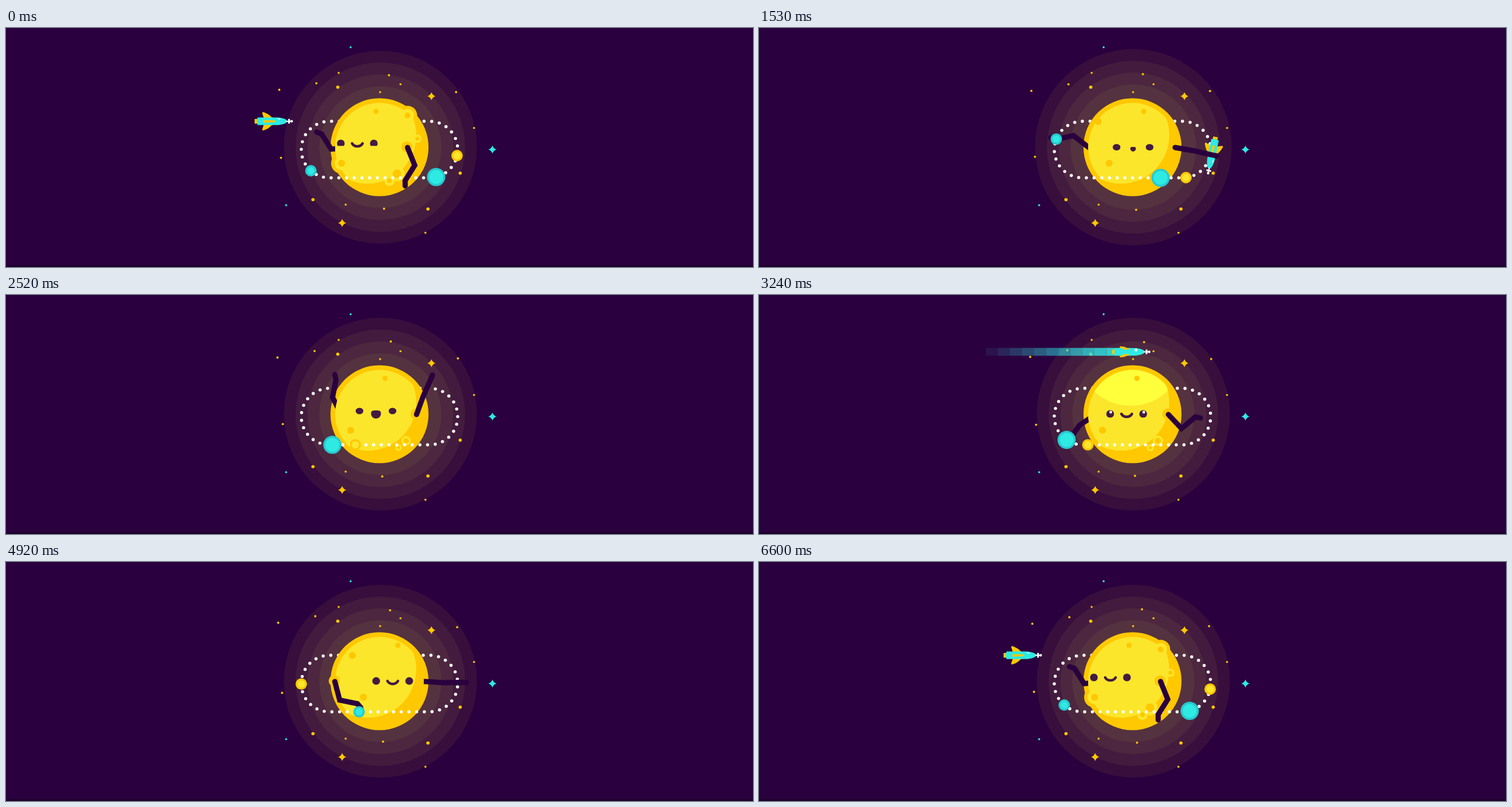
An HTML page with a canvas for the animation above (6.63 s loop, 1280x410 px).

```html
<!DOCTYPE html>
<html lang="en">
<head>
<meta charset="utf-8">
<title>Juggling sun</title>
<style>
html, body { margin: 0; width: 100%; height: 100%; overflow: hidden; background: #2a003e; }
canvas { display: block; width: 100%; height: 100%; }
</style>
</head>
<body>
<canvas id="stage" width="1280" height="410"></canvas>
<script>
const ctx = document.getElementById('stage').getContext('2d');
const LOOP = 6630, STEP = 30, TAU = Math.PI * 2;
const NIGHT = '#2a003e', AMBER = '#ffc800', YELLOW = '#fbe62c', CYAN = '#2eeae3',
      TEAL = '#26cad0', INK = '#441a42', WHITE = '#fff';
const SUN = { x: 640, y: 204.5, r: 84, inner: 76 };

const clamp = v => Math.max(0, Math.min(1, v));
const ramp = (t, from, to) => clamp((t - from) / (to - from));
const ease = (t, from, to) => {
  const u = ramp(t, from, to);
  return u * u * (3 - 2 * u);
};

// Smooth, overshoot-free curve through one value per pose, repeating every loop.
const POSES = [0, 1530, 2520, 3240, 4200, 5670];
function track(...values) {
  const n = POSES.length, at = i => (i + n) % n;
  const time = i => POSES[at(i)] + Math.floor(i / n) * LOOP;
  const rate = i => (values[at(i + 1)] - values[at(i)]) / (time(i + 1) - time(i));
  const slope = i => {
    const a = rate(i - 1), b = rate(i);
    return a * b > 0 ? 2 * a * b / (a + b) : 0;
  };
  return t => {
    let i = n - 1;
    while (i > 0 && POSES[i] > t) i--;
    const h = time(i + 1) - time(i), u = (t - time(i)) / h, v = 1 - u;
    return values[i] * v * v * (1 + 2 * u) + values[at(i + 1)] * u * u * (3 - 2 * u)
      + h * u * v * (slope(i) * v - slope(i + 1) * u);
  };
}

const turn = track(0, 25, 15.5, 13.5, 47, 20);
const faceX = track(602, 641, 634, 630, 665, 656);
const faceY = track(198, 204.5, 199, 204, 201, 207.5);
// Arm angles in degrees: upper arm, forearm.
const rightArm = [track(68, 10, -70, 47, -51, 64), track(122, 13, -66, -40, -95, 109)];
const leftArm = [track(175, 218, 243, 146, 68, 94), track(238, 168, 281, 125, -12, 67)];

// Orbit: a stadium travelled clockwise from its bottom right.
const ORBIT = { l: 554.5, r: 725.5, y: 208.5, rad: 48.5 };
const SIDE = ORBIT.r - ORBIT.l, BEND = Math.PI * ORBIT.rad, LAP = 2 * (SIDE + BEND);
function orbit(s) {
  const { l, r, y, rad } = ORBIT;
  s = ((s % LAP) + LAP) % LAP;
  if (s < SIDE) return [r - s, y + rad, Math.PI];
  s -= SIDE;
  if (s < BEND) return [l - rad * Math.sin(s / rad), y + rad * Math.cos(s / rad), Math.PI + s / rad];
  s -= BEND;
  if (s < SIDE) return [l + s, y - rad, 0];
  const a = (s - SIDE) / rad;
  return [r + rad * Math.sin(a), y - rad * Math.cos(a), a];
}

// A slow drift with two pushes that complete one lap per loop.
const DOTS = 49, DRIFT = 0.032, PUSH = 108;
const spin = (t, delay = 0) => 10 + DRIFT * t + PUSH * ease(t, 1530, 2760)
  + (LAP - PUSH - DRIFT * LOOP) * ease(t - delay, 4057, 5839);
const planets = [
  { lead: 196, delay: -517, sway: 16, r: 9.8, core: 6.3, rim: TEAL, fill: CYAN },
  { lead: 571, delay: 500, sway: 16, r: 9.8, core: 6.3, rim: AMBER, fill: YELLOW },
  { lead: -21.6, delay: 0, sway: 0, r: 15.6, core: 12, rim: TEAL, fill: CYAN }
];
const planetAt = (p, t) =>
  orbit(spin(t, p.delay) + p.lead + p.sway * Math.sin(Math.PI * t / LOOP));

function disc(x, y, r, fill) {
  if (r <= 0) return;
  ctx.fillStyle = fill;
  ctx.beginPath();
  ctx.arc(x, y, r, 0, TAU);
  ctx.fill();
}
function shape(d, fill) {
  ctx.fillStyle = fill;
  ctx.fill(new Path2D(d));
}
function placed(x, y, draw) {
  ctx.save();
  ctx.translate(x, y);
  draw();
  ctx.restore();
}
function clipped(x, y, r, draw) {
  ctx.save();
  ctx.beginPath();
  ctx.arc(x, y, r, 0, TAU);
  ctx.clip();
  draw();
  ctx.restore();
}

const wandering = [[473, 222.7], [530, 94.8], [658, 81], [466.5, 106], [773, 110], [646, 310]];
const steady = [[570, 77], [676, 96.5], [641, 110], [802, 171.5], [582, 303], [718.7, 351.3]];
const bright = [[568.5, 101.5], [778.3, 249], [526, 294.5], [723, 310.5]];
const icy = [[590.5, 33], [480, 304]];
const sparkles = [[729, 117, AMBER], [833.5, 208.5, CYAN], [576, 334.5, AMBER]];

function sky(t) {
  const grow = 3 * Math.exp(-(((t - 1530) / 380) ** 2));
  ['#380e3d', '#431b3e', '#4c273f', '#55323f'].forEach((c, i) =>
    disc(641.5, 204.5, 165.5 - 20.3 * i + grow, c));
  wandering.forEach(([x, y], i) => {
    const a = t / LOOP * TAU + (i + 1) * Math.PI;
    disc(x + 1.8 * Math.cos(a), y + 1.8 * Math.sin(a), 1.9, AMBER);
  });
  for (const [x, y] of steady) disc(x, y, 1.8, AMBER);
  for (const [x, y] of bright) disc(x, y, 2.8, AMBER);
  for (const [x, y] of icy) disc(x, y, 1.8, CYAN);
  for (const [x, y, c] of sparkles) placed(x, y, () => {
    shape('M0-7Q1.6-1.6 7 0Q1.6 1.6 0 7Q-1.6 1.6-7 0Q-1.6-1.6 0-7Z', c);
    disc(0, 0, 3.4, c);
  });
}

// Craters slide with the turn; rims open or close as they near the limb.
function craters(c) {
  const open = (from, to) => Math.sqrt(ramp(c, from, to));
  const near = open(12, 0), low = open(25, 0);
  return [
    { x: 634, y: 143, dot: 4.5, rim: 8 * open(35, 47) },
    { x: 688, y: 150, dot: 5 * near, rim: 11 * near },
    { x: 575, y: 232, dot: 6, rim: 12 * near },
    { x: 705, y: 190, dot: 3.5 * near, rim: 7 * near },
    { x: 670, y: 250, dot: 7.5 * low, rim: 13 * low },
    { x: 657, y: 262, dot: 4 * low, rim: 9 * low },
    { x: 556, y: 160.5, dot: 6, rim: 0 }
  ].map(k => ({ ...k, x: k.x + c }));
}

// The hand bends part of the way back towards the upper arm's direction.
function arm(x, angles, t) {
  const [upper, fore] = angles.map(f => f(t));
  const bones = [[33, upper], [31, fore], [9, fore + 0.6 * (upper - fore)]];
  let y = 205;
  ctx.strokeStyle = NIGHT;
  ctx.lineWidth = 9;
  ctx.lineCap = 'round';
  ctx.lineJoin = 'miter';
  ctx.beginPath();
  ctx.moveTo(x, y);
  for (const [length, angle] of bones) {
    x += length * Math.cos(angle * TAU / 360);
    y += length * Math.sin(angle * TAU / 360);
    ctx.lineTo(x, y);
  }
  ctx.stroke();
}

function face(t, lit) {
  const x = faceX(t), y = faceY(t);
  const gape = ease(t, 1150, 1850) * (1 - ease(t, 2700, 2900));
  const open = 1 - 0.85 * Math.exp(-(((t - 110) / 87) ** 2));
  for (const side of [-28.3, 28.3]) placed(x + side, y, () => {
    ctx.beginPath();
    ctx.rect(-9, -9, 18, 9 + 6.6 * (2 * open - 1));
    ctx.clip();
    ctx.scale(1, 1 - 0.15 * clamp(gape * 2));
    disc(0, 0, 6.6, INK);
    if (lit) disc(1, -3, 2.4, WHITE);
  });
  if (gape > 0.25) {
    placed(x, y + 6 * gape, () => {
      ctx.scale(gape, gape);
      shape('M-8.5-2C-8.5-8-2-7 0-7C2-7 8.5-8 8.5-2C8.5 4 4 7 0 7C-4 7-8.5 4-8.5-2Z', INK);
    });
  } else {
    ctx.strokeStyle = INK;
    ctx.lineWidth = 4.4;
    ctx.lineCap = 'round';
    ctx.beginPath();
    ctx.moveTo(x - 9, y);
    ctx.bezierCurveTo(x - 5, y + 6.7, x + 5, y + 6.7, x + 9, y);
    ctx.stroke();
  }
}

// Rocket: arrive, cruise on the orbit, get thrown away, dash across the top.
const SPEED = 0.231, JOIN = SIDE + BEND, ENTRY = 458, ARRIVE = 5900;
const THROW = 1590, THROW_TIME = 540, DASH = 2740, DASH_END = 4000;
function arrive(t) {
  const left = LOOP - t;
  return [ENTRY - 0.233 * left + 0.000143 * left * left, ORBIT.y - ORBIT.rad, 0];
}
function cruise(t) {
  const x = ENTRY + SPEED * t;
  if (x < ORBIT.l) return [x, ORBIT.y - ORBIT.rad, 0];
  const [ox, oy, angle] = orbit(JOIN + x - ORBIT.l);
  return [ox + 3 * Math.sin(angle), oy, angle];
}
function thrown(t) {
  const u = ramp(t, THROW, THROW + THROW_TIME) ** 1.4, v = 1 - u;
  const point = (a, b, c, d) => v * v * v * a + 3 * v * v * u * b + 3 * v * u * u * c + u * u * u * d;
  const rise = (a, b, c, d) => v * v * (b - a) + 2 * v * u * (c - b) + u * u * (d - c);
  const xs = [775, 900, 600, 295], ys = [228, 400, 440, 258];
  return [point(...xs), point(...ys), Math.atan2(rise(...ys), rise(...xs))];
}
const dash = t => [637 + 0.69 * (t - 3240), 97.5, 0];
const edgeFade = x => ramp(x, 300, 350) * ramp(x, 970, 860);

function rocketAt(t) {
  if (t >= ARRIVE) return { pos: arrive(t), alpha: ramp(t, ARRIVE, ARRIVE + 200) };
  if (t < THROW) return { pos: cruise(t), alpha: 1 };
  const flight = t < DASH
    ? { path: thrown, start: THROW, end: THROW + THROW_TIME, fin: 1 }
    : { path: dash, start: DASH, end: DASH_END, fin: 0.58 };
  const pos = flight.path(t);
  return { ...flight, pos, alpha: t < flight.end ? edgeFade(pos[0]) : 0 };
}

function trail(t, { path, start, end }) {
  ctx.lineCap = 'butt';
  ctx.lineWidth = 13.5;
  ctx.strokeStyle = '#2fdfe0';
  for (let i = 0; i < 12; i++) {
    const now = t - i * STEP, before = now - STEP;
    if (before < start || before >= end) continue;
    const [x, y] = path(now), [px, py] = path(before);
    ctx.globalAlpha = (1 - i / 12) * edgeFade(px);
    ctx.beginPath();
    ctx.moveTo(px, py);
    ctx.lineTo(x, y);
    ctx.stroke();
  }
  ctx.globalAlpha = 1;
}

function rocket(t, craft) {
  const { pos: [x, y, angle], path, alpha, fin = 1 } = craft;
  if (path) trail(t, craft);
  if (alpha > 0) placed(x, y, () => {
    ctx.globalAlpha = alpha;
    ctx.rotate(angle);
    ctx.fillStyle = AMBER;
    ctx.fillRect(-32, -4, 7, 8);
    ctx.save();
    ctx.scale(1, fin);
    shape('M-19-14Q-19-17-15-15Q-7-12-3-7L8-3V3L-3 7Q-7 12-15 15Q-19 17-19 14L-16 5V-5Z', AMBER);
    ctx.restore();
    shape('M-27-6.5H6C14-6.5 21-4 23-2V2C21 4 14 6.5 6 6.5H-27Q-29 0-27-6.5Z', CYAN);
    if (path) {
      shape('M-19-9H-12L0-4H-12ZM-19 9H-12L0 4H-12Z', AMBER);
      disc(9, -3, 2.4, WHITE);
    } else {
      shape('M-17-2L3-1.5V1.5L-17 2.5Z', AMBER);
      shape('M6-5L14-4L10-3Z', WHITE);
    }
    ctx.fillStyle = WHITE;
    ctx.fillRect(22, -1, 10, 2);
    ctx.fillRect(25.5, -4, 3, 8);
    disc(31.5, 0, 2.2, WHITE);
  });
}

function dots(t, front) {
  for (let i = 0; i < DOTS; i++) {
    const [x, y] = orbit(spin(t) + i * LAP / DOTS);
    if ((y >= ORBIT.y) === front) disc(x, y, 2.7, WHITE);
  }
}
const isBehind = ([x, y]) => y > 120 && y < 185 && Math.abs(x - SUN.x) < 110;
function drawPlanets(t, behind) {
  for (const p of planets) {
    const pos = planetAt(p, t);
    if (isBehind(pos) !== behind) continue;
    disc(pos[0], pos[1], p.r, p.rim);
    disc(pos[0], pos[1], p.core, p.fill);
  }
}

function sun(c, glowX, drawBackArm) {
  const spots = craters(c);
  disc(SUN.x, SUN.y, SUN.r, AMBER);
  for (const { x, y, rim } of spots) disc(x, y, rim * 1.5, AMBER);
  drawBackArm();
  clipped(SUN.x, SUN.y, SUN.inner, () => {
    disc(SUN.x, SUN.y, SUN.r, AMBER);
    disc(620, 184, 83, YELLOW);
    if (glowX) clipped(620, 184, 83, () => disc(glowX, 98, 92, '#ffff3b'));
  });
  clipped(SUN.x, SUN.y, SUN.r, () => {
    for (const { x, y, rim } of spots) disc(x, y, rim, YELLOW);
    for (const { x, y, dot } of spots) disc(x, y, dot, AMBER);
  });
}

function draw(t) {
  ctx.fillStyle = NIGHT;
  ctx.fillRect(0, 0, 1280, 410);
  ctx.fillStyle = '#1d002c';
  ctx.fillRect(0, 407, 1280, 3);

  // Shoulders ride around the ball: the near one moves with the turn, the far one against it.
  const c = turn(t);
  const shoulders = [
    { x: Math.min(688 + c, 754 - c), angles: rightArm },
    { x: Math.max(526 + c, 590 - c), angles: leftArm }
  ];
  const [near, far] = c > 32.5 ? shoulders.reverse() : shoulders;
  const craft = rocketAt(t);
  const dashing = craft.path === dash;
  const rocketBehind = !craft.path && isBehind(craft.pos);

  sky(t);
  dots(t, false);
  drawPlanets(t, true);
  if (rocketBehind) rocket(t, craft);
  sun(c, dashing && craft.pos[0], () => arm(far.x, far.angles, t));
  disc(near.x - 1, 204, 9.5, AMBER);
  face(t, dashing && t > 2940 && t < 3600);
  dots(t, true);
  if (!rocketBehind) rocket(t, craft);
  arm(near.x, near.angles, t);
  drawPlanets(t, false);
}

const begin = performance.now();
function tick() {
  const t = Math.max(0, performance.now() - begin) % LOOP;
  draw(Math.floor(t / STEP) * STEP);
  requestAnimationFrame(tick);
}
tick();
</script>
</body>
</html>
```
